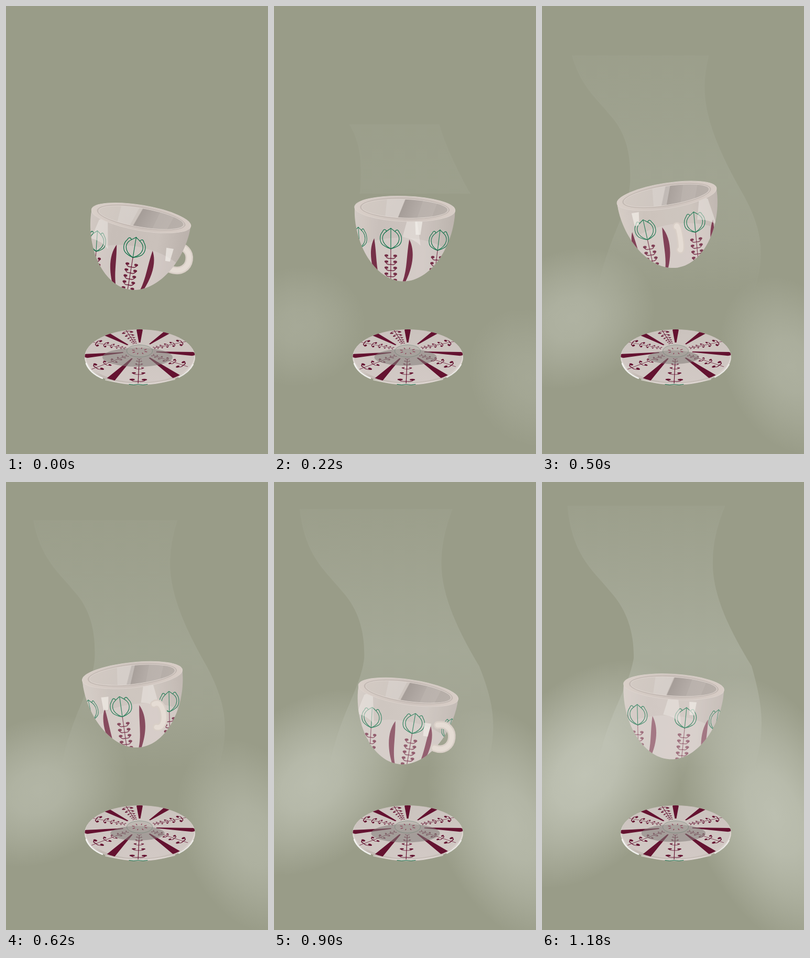
An HTML page with a canvas that plays this animation: 500 by 852 pixels, repeating every 1.2 s.

```html
<!DOCTYPE html>
<html>
<head>
<meta charset="utf-8">
<style>
html, body { margin: 0; height: 100%; overflow: hidden; background: #999c88; }
canvas { display: block; }
</style>
</head>
<body>
<canvas id="stage" width="500" height="852"></canvas>
<script>
const ctx = document.getElementById('stage').getContext('2d');
const LOOP = 1200, SWING = 990, TAU = Math.PI * 2;
const WINE = '#641230', GREEN = '#0f7048';
const rad = deg => deg * Math.PI / 180;
const wave = (t, lag = 0) => Math.cos(TAU * (t - lag) / SWING);

// Turning of the painted pattern and of the handle, [ms, degrees]
const patternTurn = [[0, -2], [220, 104], [360, 158], [500, 206], [740, 233], [900, 252], [1180, 313]];
const handleTurn = [[0, 108], [220, 190], [360, 251], [500, 367], [740, 395], [900, 420], [1180, 525]];

// Smooth curve through the keys
function track(keys, t) {
  const last = keys.length - 1;
  let i = 0;
  while (i < last - 1 && t >= keys[i + 1][0]) i++;
  const slope = j => {
    const a = keys[Math.max(j - 1, 0)], b = keys[Math.min(j + 1, last)];
    return (b[1] - a[1]) / (b[0] - a[0]);
  };
  const [t0, v0] = keys[i], [t1, v1] = keys[i + 1];
  const d = t1 - t0, u = (t - t0) / d, w = 1 - u;
  return v0 * (1 + 2 * u) * w * w + v1 * u * u * (3 - 2 * u)
    + d * (slope(i) * u * w * w - slope(i + 1) * u * u * w);
}

function layer(draw) {
  ctx.save();
  draw();
  ctx.restore();
}

function oval(x, y, rx, ry, fill, line, width = 1) {
  ctx.beginPath();
  ctx.ellipse(x, y, rx, ry, 0, 0, TAU);
  if (fill) { ctx.fillStyle = fill; ctx.fill(); }
  if (line) { ctx.strokeStyle = line; ctx.lineWidth = width; ctx.stroke(); }
}

function shade(x0, y0, x1, y1, ...stops) {
  const g = ctx.createLinearGradient(x0, y0, x1, y1);
  stops.forEach(([at, color]) => g.addColorStop(at, color));
  return g;
}

function shape(d, fill) {
  ctx.fillStyle = fill;
  ctx.fill(new Path2D(d));
}

function line(d, color, width) {
  ctx.strokeStyle = color;
  ctx.lineWidth = width;
  ctx.stroke(new Path2D(d));
}

// Stem along +y; leafY(i) places each pair of curled leaves, size(y) scales it
function sprig(from, to, pairs, leafY, size) {
  line(`M0,${from}V${to}`, WINE, 1.2);
  for (let i = 0; i < pairs; i++) {
    const y = leafY(i), k = size(y);
    for (const s of [-1, 1]) {
      line(`M0,${y + 4 * k}Q${s * 7 * k},${y + 6 * k} ${s * 10 * k},${y}`, WINE, 1.5 * k);
      oval(s * 8.5 * k, y - k, 3.7 * k, 2.3 * k, WINE);
    }
  }
}

function fogBlob(x, y, long, short, angle, alpha) {
  layer(() => {
    ctx.translate(x, y);
    ctx.rotate(rad(angle));
    ctx.scale(long, short);
    const g = ctx.createRadialGradient(0, 0, 0, 0, 0, 1);
    [[0, 1], [0.3, 0.88], [0.6, 0.54], [0.85, 0.2], [1, 0]].forEach(([at, a]) =>
      g.addColorStop(at, `rgba(214,217,206,${a * alpha})`));
    oval(0, 0, 1, 1, g);
  });
}

function fog(p) {
  const a = 0.64 * p ** 0.65;
  fogBlob(38 + 45 * p, 622 - 66 * p, 102 + 145 * p, 102 + 65 * p, -50 * p, a);
  fogBlob(497 - 54 * p, 724 - 94 * p, 102 + 178 * p, 102 + 55 * p, 66, a * 0.9);
}

function steam(t, p) {
  const grow = Math.exp(-(t - 220) / 220);
  const top = Math.min(43 + 182 * grow, 330), bottom = Math.min(357 + 0.66 * Math.max(t - 220, 0), 545);
  const a = 0.27 * p ** 0.8;
  layer(() => {
    ctx.beginPath();
    ctx.rect(0, top, 500, bottom - top);
    ctx.clip();
    shape(`M48,40C55,140 100,170 130,208C164,245 ${165 + 11 * p},290 ${163 + 12 * p},335
      C165,395 125,440 105,545H405C428,470 420,420 ${364 + 36 * p},350
      C${330 + 30 * p},285 ${298 + 26 * p},215 ${299 + 27 * p},150Q${302 + 24 * p},100 ${325 + 27 * p},40Z`,
      shade(0, 43, 0, 545, [0, `rgba(207,213,204,${a * 0.2})`], [0.55, `rgba(207,213,204,${a})`],
        [0.8, `rgba(214,217,210,${a * 0.7})`], [1, 'rgba(214,217,210,0)']));
  });
}

// Draws with +y running from the plate's middle to a point on its edge
function spoke([x, y], draw) {
  layer(() => {
    ctx.translate(255, 656);
    ctx.scale(1, 0.5);
    ctx.rotate(Math.atan2(y * 2, x) - Math.PI / 2);
    draw(Math.hypot(x, y * 2));
  });
}

function plate(t) {
  oval(255.5, 668, 105.5, 53, shade(150, 0, 361, 0, [0, '#e2dcd7'], [0.15, '#c3bab4'], [0.8, '#c9c0ba'], [1, '#e2dbd6']));
  layer(() => {
    ctx.beginPath();
    ctx.ellipse(255.5, 666.5, 105, 51.5, 0, 0, TAU);
    ctx.clip();
    oval(255.5, 665.5, 104, 50, shade(0, 615, 0, 717, [0, '#cbc3be'], [1, '#d2c9c5']));
    [[0, -43], [107, 6], [75, 52], [-59, 58], [-107, 10], [-67, -34], [55, -37]].forEach(end =>
      spoke(end, len => {
        const w = len / 14.5;
        shape(`M-1.5,32Q${-w * 0.55},${len * 0.6} ${-w},${len - 6}Q0,${len + 8} ${w},${len - 6}Q${w * 0.55},${len * 0.6} 1.5,32Z`, WINE);
      }));
    // Leaf pairs spread out and grow toward the edge
    [[-3, 64], [-92, 35], [-91, -17], [-27, -41], [89, -18], [92, 30]].forEach(end =>
      spoke(end, len => sprig(30, len, 6, i => 30 * (len * 0.86 / 30) ** (i / 5), y => y * 0.0125)));
    layer(() => {
      ctx.globalAlpha = 0.55;
      const c = wave(t);
      oval(251, 668, 58 + 9 * c, 15.5 + 2.5 * c, '#817c78');
    });
    oval(255, 656, 24.5, 11.5, 'rgba(170,166,160,.45)', 'rgba(82,112,96,.55)', 0.8);
    for (let i = 0; i < 8; i++) {
      const a = TAU * i / 8 + 0.3, x = Math.cos(a), y = Math.sin(a);
      line(`M${255 + x * 10},${656 + y * 4}L${255 + x * 15},${656 + y * 6.5}`, '#8a4056', 1.3);
    }
  });
  ctx.lineCap = 'round';
  line('M153,680Q160,698 184,708', 'rgba(255,255,255,.85)', 2.5);
  line('M330,706Q350,696 357,682', 'rgba(255,255,255,.7)', 2);
  line('M190,711Q255,727 322,710', 'rgba(240,234,230,.6)', 2);
  line('M235,719.5Q244,721.5 252,719.5Q262,721.5 270,719.5', GREEN, 1);
}

function tulip() {
  line('M0,-19V20', GREEN, 1.2);
  for (const s of [-1, 1]) layer(() => {
    ctx.scale(s, 1);
    line('M0,-19C8,-13 17,-9 16,2C15,11 6,17 0,20', GREEN, 1.3);
    line('M8,-13C11,-18 14,-17 16,-12C23,-4 22,9 14,14Q8,18 0,20', GREEN, 1.3);
  });
}

// Places a drawing on the cup's wall at an angle from the front
function onWall(deg, y, draw) {
  const a = rad(deg), facing = Math.cos(a);
  if (facing < 0.15) return;
  layer(() => {
    ctx.transform(facing ** 0.28, 0, -0.12 * Math.sin(a), 1, 90 * Math.sin(a), y);
    draw();
  });
}

function leaf(side) {
  layer(() => {
    ctx.scale(side, 1);
    shape('M1,-2C13,18 12,50 -5,84L-8,79C0,55 -3,28 1,-2Z', WINE);
  });
}

function pattern(turn, handle, p) {
  const ink = 0.9 - 0.24 * p * p;
  // The wall stays plain beside the handle while it points away
  const plain = deg => Math.cos(rad(handle)) < 0 && Math.cos(rad(deg - handle)) > 0.5;
  const paint = (deg, y, draw) => plain(deg) || onWall(deg, y, draw);
  const flower = deg => paint(deg, 57, () => {
    tulip();
    ctx.globalAlpha = ink;
    sprig(20, 90, 5, i => 34 + 11.5 * i, () => 1);
  });
  for (let i = 0; i < 3; i++) {
    const deg = turn + 120 * i;
    flower(deg);
    flower(deg + 64);
    for (const side of [-1, 1]) paint(deg + 22 * side, 60, () => {
      ctx.globalAlpha = ink;
      leaf(side);
    });
  }
}

function handleArc(deg) {
  const s = Math.sin(rad(deg)), dy = 14 * Math.cos(rad(deg));
  const d = `M${74 * s},${47 + dy}C${119 * s},${35 + dy} ${122 * s},${100 + dy} ${74 * s},${91 + dy}`;
  ctx.lineCap = 'round';
  line(d, '#d9cfc7', 14.5);
  line(d, '#e5dcd4', 9);
}

const BOWL = 'M-96,0C-96,70 -52,138 0,138C52,138 96,70 96,0Z';

function cup(t, p) {
  const c = wave(t), handle = track(handleTurn, t), inFront = Math.cos(rad(handle)) > 0;
  ctx.translate(248 + 10 * c, 382 + 21 * c);
  ctx.rotate(rad(0.4 + 9.2 * c));
  if (!inFront) handleArc(handle);

  layer(() => {
    ctx.clip(new Path2D(BOWL));
    ctx.fillStyle = shade(-96, 0, 96, 0, [0, '#d2c9c3'], [0.25, '#c7beb8'], [0.7, '#cac1bb'], [1, '#bab1ab']);
    ctx.fillRect(-96, 0, 192, 140);
    oval(0, 112, 110, 57, 'rgba(222,213,209,.42)');
    pattern(track(patternTurn, t), handle, p);
    // Window reflections slide across the glaze
    layer(() => {
      ctx.translate(-75 * wave(t, -60), 44);
      shape('M-9,-27Q0,-34 8,-26L17,25Q4,12 -18,10Z', 'rgba(240,236,232,.5)');
    });
    layer(() => {
      ctx.translate(66 * wave(t, 40), 47 + 19 * wave(t, 860));
      shape('M-7,-12L7,-12L4,13L-5,13Z', 'rgba(248,245,240,.62)');
    });
    ctx.fillStyle = `rgba(232,224,222,${0.28 * p})`;
    ctx.fillRect(-96, 0, 192, 140);
  });

  oval(0, 0, 96, 24, shade(-96, 0, 96, 0, [0, '#d9cfc8'], [0.5, '#cdc3bd'], [1, '#d8cdc6']), '#dcd3cd', 1);
  oval(0, -0.5, 85, 19.5, '#c9bfb9', '#b9afa9', 0.8);
  layer(() => {
    ctx.beginPath();
    ctx.ellipse(0, -0.5, 82, 18, 0, 0, TAU);
    ctx.clip();
    ctx.fillStyle = shade(-80, -30, 80, 30, [0, '#d3cac3'], [0.4, '#cec6c0'], [0.46, '#cdc5bf'], [0.47, '#a59d98'], [0.64, '#b3aba6'], [1, '#b9b1ab']);
    ctx.fillRect(-82, -20, 164, 40);
    const x = -8 * c;
    shape(`M${-33 + x},-20H${2 + x}L${-12 + x},20H${-36 + x}Z`, 'rgba(222,216,211,.5)');
    shape('M35,-20H64L50,20H23Z', 'rgba(214,208,203,.16)');
  });
  oval(0, -0.5, 82, 18, null, '#ddd4ce', 1);
  if (inFront) handleArc(handle);
}

function frame(now) {
  const t = Math.floor(now % LOOP / 20) * 20, p = t / 1180;
  ctx.fillStyle = '#999c88';
  ctx.fillRect(0, 0, 500, 852);
  fog(p);
  steam(t, p);
  layer(() => plate(t));
  layer(() => cup(t, p));
  requestAnimationFrame(frame);
}
requestAnimationFrame(frame);
</script>
</body>
</html>
```
